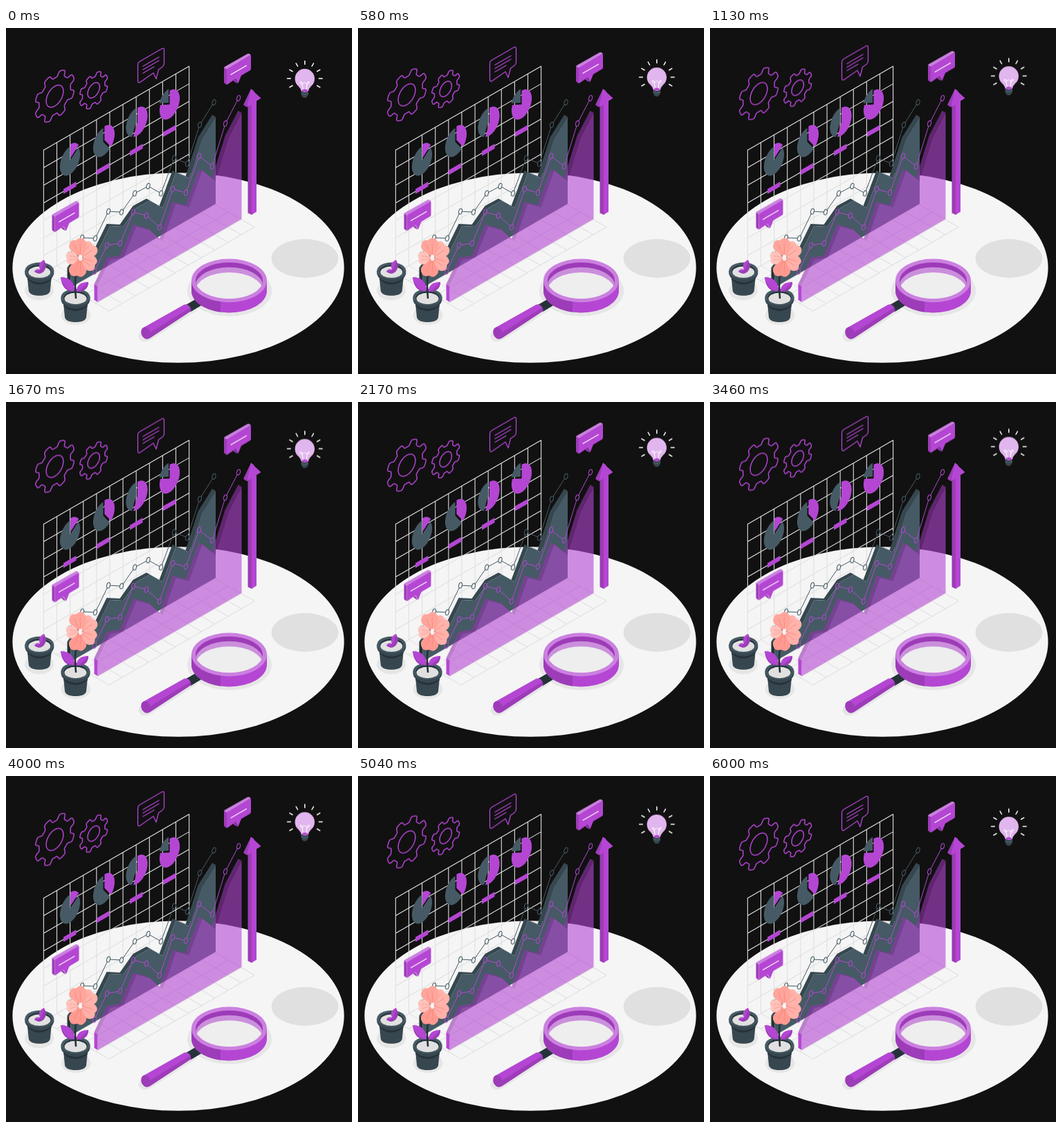
Write an HTML page that moves like this. It is 500 px wide and 500 px high and loops after 6040 ms.

```html
<!DOCTYPE html>
<html lang="en">
<head>
<meta charset="utf-8">
<title>Growth chart</title>
<style>
html, body { margin: 0; width: 100%; height: 100%; overflow: hidden; background: #111; }
svg { display: block; width: 100vw; height: 100vh; }
.main { fill: #b446d3; }
.deep { fill: #9d3cb8; }
.pale { fill: #cb80e0; }
.slate { fill: #455a64; }
.night { fill: #37474f; }
.ink { fill: #263238; }
.shade { fill: #e0e0e0; }
.soft { fill: #e6e6e6; }
.line { fill: none; stroke-linecap: round; stroke-linejoin: round; }
</style>
</head>
<body>
<svg viewBox="0 0 500 500">
  <defs>
    <g id="bubble">
      <path class="pale" d="M315 57.5Q315 56.500 316 56L349 37.300Q350.500 36.500 352 37.400L354 38.900 319 60Z"/>
      <path class="deep" d="M315 57.300L319 59.800V82L316 80Q315 79.300 315 78.200ZM331 74l-3 1.800 4 3.200 3 .8Z"/>
      <path class="main" d="M319 61Q319 59.500 320.300 58.800L352.500 39.800Q354 39 354 40.500V59Q354 60.500 352.700 61.300L340 68.700 335.500 80 331.500 73.600 320.500 81.300Q319 82.200 319 80.700Z"/>
      <path class="line" stroke="#fff" stroke-width="1.200" d="M325 67.300L347.500 54.200"/>
    </g>
    <g id="pot">
      <path class="night" d="M-18 4L-15.500 29Q-14 36 0 36Q14 36 15.500 29L18 4Z"/>
      <path class="ink" d="M-17.400 10Q-10 17 0 17Q10 17 17.400 10L17 13Q9 20 0 20Q-9 20-17 13Z"/>
      <path class="night" d="M-21 0V4Q-19 15.500 0 16Q19 15.500 21 4V0Z"/>
      <ellipse class="slate" rx="21" ry="12"/>
      <ellipse class="ink" cy="1" rx="17" ry="9.500"/>
      <ellipse class="shade" cy="2" rx="16" ry="8.300"/>
    </g>
    <path id="petal" d="M0-1C-5-7-17-15-11-23Q-8-29-1-26Q7-31 11-24C17-15 5-7 0-1Z"/>
  </defs>

  <rect width="500" height="500" fill="#111"/>
  <ellipse cx="249" cy="346.500" rx="239.600" ry="137.300" fill="#f5f5f5"/>
  <ellipse class="shade" cx="432" cy="333" rx="48.300" ry="28"/>
  <path id="grid" class="line" stroke="#e0e0e0" stroke-width="1.100"/>
  <g id="pies"></g>
  <g id="charts"></g>

  <g id="arrow">
    <path class="deep" d="M343 111L354 88 358.500 91 355 110V270L349.500 267.200V110L348 114.500Z"/>
    <path class="main" d="M354 88L368.500 101.500 362 105.500V265.500L355 270V110.500L348 114.500Z"/>
  </g>

  <g id="glass">
    <ellipse class="soft" cx="323" cy="380" rx="61" ry="36.500"/>
    <path class="soft" d="M191 446Q192 438 204 434L268 398 276 408 212 449Q196 459 191 446Z"/>
    <path class="ink" d="M260 400L277 390.300Q286 388 285.500 399L267 410Z"/>
    <path class="main" d="M198.500 433L257.500 399.800Q266 398 267.500 408.500L206.500 449Z"/>
    <path class="deep" d="M206.500 449L267.500 409 266.500 404 208 440Z"/>
    <ellipse class="deep" cx="202" cy="441" rx="6.500" ry="8.800" transform="rotate(-22 202 441)"/>
    <path class="main" d="M268 365V380A54.500 31.500 0 0 0 377 380V365Z"/>
    <path class="deep" d="M268 365V380A54.500 31.500 0 0 0 310 410.700V390Z"/>
    <ellipse class="pale" cx="322.500" cy="365" rx="54.500" ry="31.500"/>
    <clipPath id="hole"><ellipse cx="322.500" cy="365" rx="48.500" ry="26.300"/></clipPath>
    <g clip-path="url(#hole)">
      <rect class="deep" x="270" y="335" width="105" height="60"/>
      <ellipse cx="322.500" cy="372" rx="48.500" ry="26.300" fill="#cb8fdc"/>
      <ellipse cx="322.500" cy="379.500" rx="48.500" ry="26.300" fill="#eee"/>
    </g>
  </g>

  <ellipse class="soft" cx="48" cy="379" rx="21" ry="14.500"/>
  <use href="#pot" x="48.300" y="350.800"/>
  <path class="main" d="M41 352Q43 347 49 349Q45 340 55 335Q60 344 55 351Q49 358 41 352Z"/>
  <path class="deep" d="M41 352Q48 352 51 348L55 336Q60 345 55 351Q49 358 41 352Z"/>

  <ellipse class="soft" cx="101" cy="415" rx="21.500" ry="14"/>
  <use href="#pot" x="100.500" y="389"/>
  <path class="main" d="M99.500 380Q82 383 79 360Q98 360 99.500 380ZM102 381Q102 367 119 367Q119 381 102 381Z"/>
  <path class="deep" d="M99.500 380Q83 379 79 360Q82 383 99.500 380ZM102 381Q111 377 119 367Q119 381 102 381Z"/>
  <path class="line" stroke="#263238" stroke-width="2.600" d="M101 355Q99 372 101 390"/>
  <g id="flower"></g>

  <g id="float">
    <g id="gears" class="line" stroke="#b446d3" stroke-width="1.500"></g>
    <path class="line" stroke="#b446d3" stroke-width="1.300" d="M190.500 53Q190.500 50 193 48.500L225.500 29.700Q228.500 28.300 228.500 31.500V51.500Q228.500 54.500 226 56.200L220.500 60 217 73.500 213 65 194 78.300Q190.500 80 190.500 76.500ZM198 55.300L221 42M198 60.300L221 47M198 65.300L214 56"/>
    <use href="#bubble"/>
    <use href="#bubble" x="-248.500" y="213"/>
    <g id="bulb">
      <path id="rays" class="line" stroke="#fff" stroke-width="1.500"/>
      <path d="M426.500 91Q426 87.500 422.500 84A14.200 14.200 0 1 1 441 84Q437.500 87.500 437 91Q432 95 426.500 91Z" fill="#e1b5ed"/>
      <path class="line" stroke="#fff" stroke-width="1" d="M429.500 90L428 81Q424 81 425.500 77.500Q429 78 428.500 81L431.500 78 434.500 81Q435 77.500 438 77.500Q439 81 435 81L434 90"/>
      <ellipse class="main" cx="431.800" cy="90.500" rx="4" ry="2"/>
      <path class="night" d="M426.500 91.500Q431.500 95.500 437 91.500V96Q435 101 431.800 101Q428 101 426.500 96Z"/>
      <path class="line" stroke="#607d8b" stroke-width=".7" d="M426.700 94Q431.700 97.500 436.800 94"/>
    </g>
  </g>
</svg>
<script>
const $ = id => document.getElementById(id);
const add = (id, markup) => $(id).insertAdjacentHTML('beforeend', markup);
const rad = deg => deg * Math.PI / 180;
const fix = n => n.toFixed(2);
const poly = pts => 'M' + pts.map(p => p.map(fix).join(' ')).join('L');
const seg = (x1, y1, x2, y2) => poly([[x1, y1], [x2, y2]]);

// Isometric wall and floor
const wall = { x: 54.4, y: 176.4, w: 210.2, rise: 121.2, h: 178 };
function drawGrid() {
  const { x, y, w, rise, h } = wall, side = 94.5, drop = 54.5;
  let d = '';
  for (let i = 0; i <= 11; i++) {
    const px = x + w * i / 11, py = y - rise * i / 11;
    d += seg(px, py, px, py + h) + seg(px, py + h, px + side, py + h + drop);
  }
  for (let i = 0; i <= 7; i++) d += seg(x, y + h * i / 7, x + w, y - rise + h * i / 7);
  for (let i = 1; i <= 5; i++) {
    const px = x + side * i / 5, py = y + h + drop * i / 5;
    d += seg(px, py, px + w, py - rise);
  }
  $('grid').setAttribute('d', d);
}

function sector(cx, cy, from, to, cls) {
  const pts = [[cx, cy]];
  for (let i = 0; i <= 40; i++) {
    const a = rad(from + (to - from) * i / 40);
    pts.push([cx + 14.6 * Math.cos(a), cy + 20 * Math.sin(a) - 9 * Math.cos(a)]);
  }
  add('pies', `<path class="${cls}" d="${poly(pts)}Z"/>`);
}

// slate centre, purple centre, purple end angle
const pies = [
  [92.5, 191.5, 93, 188, -34],
  [140.5, 164.5, 142.4, 162, 50],
  [188, 135.5, 190, 135.5, 114],
  [235, 108, 236.5, 110.5, 202]
];
function drawPies() {
  pies.forEach(([sx, sy, px, py, end], i) => {
    sector(sx, sy, end, 270, 'slate');
    sector(px, py, -90, end, 'main');
    const x = 83 + 48 * i, y = 232.8 - 27.4 * i;
    add('pies', `<path class="main" d="M${x} ${y}l18.500-10.700v7l-18.500 10.700Z"/>`);
  });
}

const slateLine = [[91, 328], [110, 303], [129, 304], [148, 265], [167, 266], [186, 239],
  [205.5, 228.5], [224, 239], [243, 188], [262, 196], [280, 140], [300.500, 107.500]];
const purpleLine = [[128, 352], [146, 314], [165, 311], [184, 266], [203, 271], [222, 288],
  [241, 233], [260, 238], [279, 185], [298, 200], [317, 138], [336, 101.500]];

function drawChart(line, dx, base, front, strip, side, alpha, stroke) {
  const depth = [5, 2.9];
  const back = line.map(([x, y]) => [x + dx, y + 18]);
  const face = back.map(([x, y]) => [x + depth[0], y + depth[1]]);
  const [x0, y0] = face[0], x1 = face[face.length - 1][0];
  const left = base + (x1 - x0) * 0.577;
  const edge = poly([...back, ...face.slice().reverse()]) + 'Z';
  const area = poly([...face, [x1, base], [x0, left]]) + 'Z';
  const end = poly([back[0], [x0, y0], [x0, left], [x0 - depth[0], left - depth[1]]]) + 'Z';
  add('charts', `<path d="${edge}" fill="${strip}" opacity="${alpha}"/>
    <path d="${area}" fill="${front}" opacity="${alpha}"/><path d="${end}" fill="${side}"/>`);

  // Joints stay hollow, so each link stops short of them
  let d = '';
  for (let i = 1; i < line.length; i++) {
    const [ax, ay] = line[i - 1], [bx, by] = line[i];
    const a = Math.atan2(by - ay, bx - ax);
    const r = 1 / Math.hypot(Math.cos(a) / 2.6, Math.sin(a) / 4);
    const ux = r * Math.cos(a), uy = r * Math.sin(a);
    d += seg(ax + ux, ay + uy, bx - ux, by - uy);
  }
  const dots = line.map(([x, y]) =>
    `<ellipse cx="${x}" cy="${y}" rx="2.400" ry="4.100" transform="rotate(16 ${x} ${y})"/>`).join('');
  add('charts', `<g class="line" stroke="${stroke}" stroke-width="1"><path d="${d}"/>${dots}</g>`);
}

function drawGear(cx, cy, r, hole) {
  const ring = radius => {
    const pts = [];
    for (let deg = 0; deg < 360; deg += 1.5) {
      const a = rad(deg), q = radius(a);
      pts.push([cx + 0.866 * q * Math.cos(a), cy + q * (Math.sin(a) - 0.5 * Math.cos(a))]);
    }
    return poly(pts) + 'Z';
  };
  // Eight rounded teeth
  const tooth = a => r * (0.89 - 0.11 * Math.tanh(3 * Math.cos(8 * a)));
  add('gears', `<path d="${ring(tooth)}${ring(() => hole)}"/>`);
}

// turn, size, colour
const petals = [
  [192, 1, '#ff9a90'], [118, 0.9, '#ffb0a8'], [46, 0.98, '#ffb3ab'],
  [-12, 1, '#ffa59c'], [268, 0.74, '#ffc2bb']
];
function drawFlower() {
  petals.forEach(([turn, size, tone]) => {
    add('flower', `<g transform="translate(107.500 332) rotate(${turn}) scale(${size})">
      <use href="#petal" fill="${tone}"/>
      <path class="line" stroke="#f58478" stroke-width=".7" d="M-1-5Q-4-13-4-20M1-5Q3-13 4-20"/></g>`);
  });
  add('flower', '<ellipse cx="107.500" cy="332" rx="2.600" ry="4.500" fill="#fff0ee"/>');
}

function drawRays() {
  let d = '';
  for (let i = 0; i < 9; i++) {
    const a = rad(-210 + 30 * i), c = Math.cos(a), s = Math.sin(a);
    d += seg(431.8 + 20.5 * c, 73 + 20.5 * s, 431.8 + 25.3 * c, 73 + 25.3 * s);
  }
  $('rays').setAttribute('d', d);
}

drawGrid();
drawPies();
drawChart(slateLine, -2.5, 254, '#455a64', '#37474f', '#263238', 1, '#455a64');
drawChart(purpleLine, -0.5, 276, '#b446d3', '#9433b0', '#b446d3', 0.6, '#b446d3');
drawGear(70.5, 98.5, 33.5, 14.3);
drawGear(126.7, 90, 24, 10);
drawFlower();
drawRays();

$('float').animate(
  [0, -10, 0].map(y => ({ transform: `translate(0px, ${y}px)` })),
  { duration: 6040, iterations: Infinity, easing: 'linear' }
);
</script>
</body>
</html>
```
